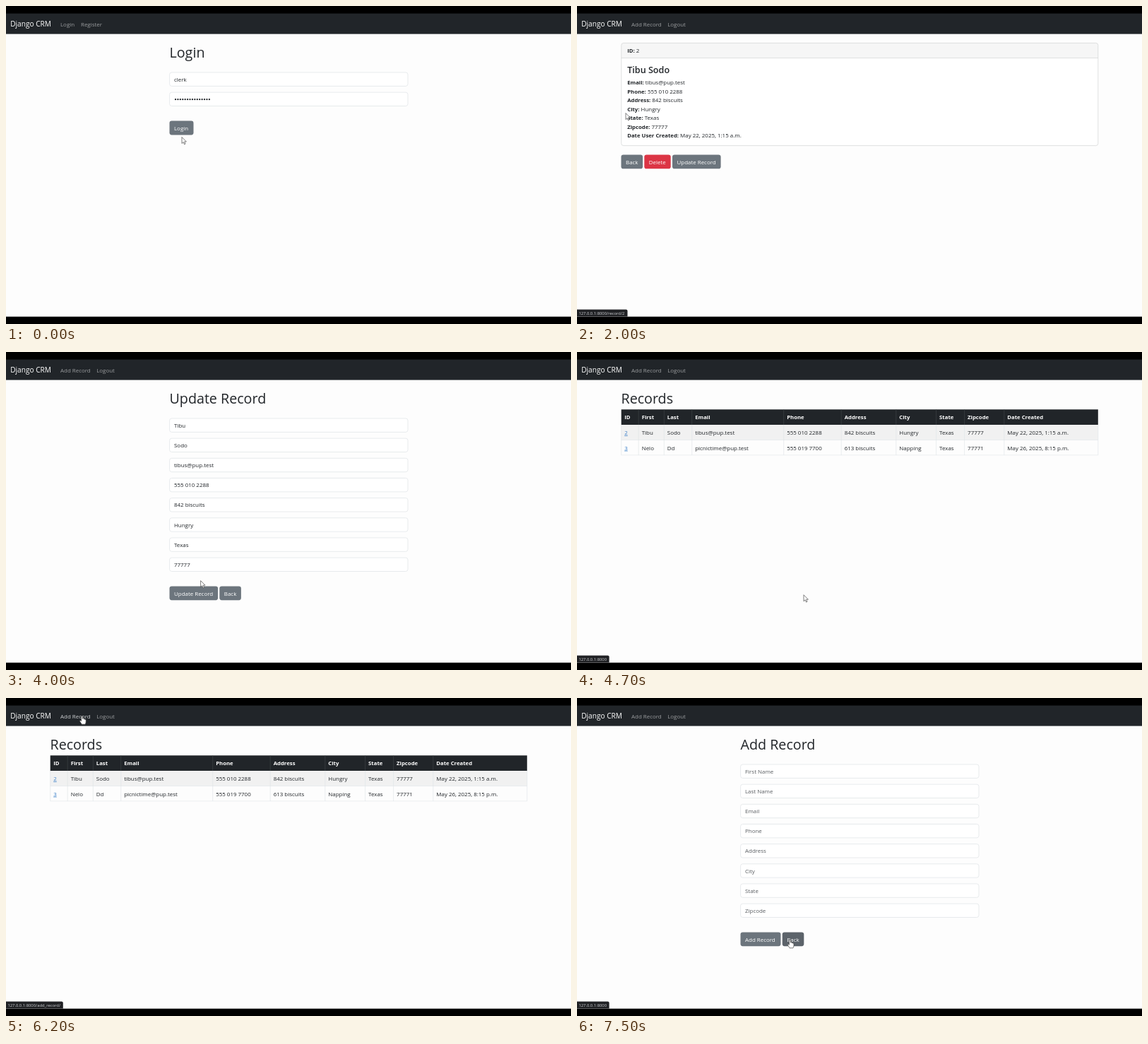
Animation, 800 px wide and 450 px high, one loop 8000 ms. Source, as an HTML page:

```html
<!DOCTYPE html>
<html lang="en">
<head>
<meta charset="utf-8">
<title>Django CRM</title>
<style>
html, body { margin: 0; width: 100%; height: 100%; overflow: hidden; background: #000; }
svg { display: block; width: 800px; height: 450px; }
text { font: 7.95px "Open Sans", "Noto Sans", sans-serif; fill: #212529; }
.b { font-weight: 700; font-size: 7.75px; }
.h1 { font-size: 19.7px; font-weight: 500; }
.h4 { font-size: 12.6px; font-weight: 600; }
.brand { font-size: 10.1px; fill: #fff; }
.nav { fill: #9b9d9f; }
.nav.on { fill: #cfd1d3; }
.white { fill: #fff; }
.hint { fill: #585c60; }
.link { fill: #3a7fc8; text-decoration: underline; }
.tip { font-size: 5.85px; fill: #d0d2d6; }
.btn { fill: #6c757d; }
.btn.red { fill: #dc3545; }
.btn.on { fill: #5c636a; }
.btn.down { fill: #565e64; }
.line { fill: none; stroke: #dee2e6; stroke-width: .6; }
</style>
</head>
<body>
<svg id="stage" viewBox="0 0 800 450"></svg>
<script>
const LOOP = 8000, STEP = 100;
const $ = id => document.getElementById(id);

const people = [
  ['2', 'Tibu', 'Sodo', 'tibus@pup.test', '555 010 2288', '842 biscuits', 'Hungry', 'Texas', '77777', 'May 22, 2025, 1:15 a.m.'],
  ['3', 'Nelo', 'Dd', 'picnictime@pup.test', '555 019 7700', '613 biscuits', 'Napping', 'Texas', '77771', 'May 26, 2025, 8:15 p.m.']
];
const heads = ['ID', 'First', 'Last', 'Email', 'Phone', 'Address', 'City', 'State', 'Zipcode', 'Date Created'];
const cols = [62.7, 87.2, 123.3, 162.7, 292.7, 374.2, 451.8, 508.6, 548.6, 604.8, 737.8];
const rowTop = [103, 124.5], rowH = 21.4, flashH = 38.6;

const text = (x, y, s, cls = '', id = '') => `<text x="${x}" y="${y}" class="${cls}" id="${id}">${s}</text>`;
const rect = (x, y, w, h, attrs) => `<rect x="${x}" y="${y}" width="${w}" height="${h}" ${attrs}/>`;
const group = (id, body) => `<g id="${id}">${body}</g>`;

function button(x, y, w, label, id = '', cls = '') {
  return rect(x, y, w, 19.8, `rx="3.1" class="btn ${cls}" id="${id}"`) + text(x + 6.5, y + 13.1, label, 'white');
}

function field(i, value, cls) {
  const y = 94 + 28.15 * i;
  return rect(231.6, y, 337.4, 19.4, 'rx="3.1" fill="#fff" stroke="#dee2e6" stroke-width=".7"') +
    text(238, y + 12.8, value, cls);
}

function form(id, title, values, cls, w) {
  return group(id, text(231.5, 72.9, title, 'h1') +
    values.map((v, i) => field(i, v, cls)).join('') +
    button(231.5, 331.4, w, title) +
    button(231.5 + w + 2.2, 331.4, 30.6, 'Back', id + 'Back'));
}

function loginPage() {
  let dots = '';
  for (let i = 0; i < 15; i++) dots += `<circle cx="${240 + i * 3.42}" cy="132.2" r="1.15" fill="#212529"/>`;
  return group('login', text(231.5, 72.9, 'Login', 'h1') + field(0, 'clerk', '') + field(1, '', '') +
    dots + button(231.5, 162.6, 34, 'Login'));
}

function listPage() {
  const [left, right] = [cols[0], cols[10]];
  let s = text(62.5, 72.9, 'Records', 'h1') + rect(left, 81.3, right - left, 21.7, 'fill="#212529"');
  rowTop.forEach((y, i) => { s += rect(left, y, right - left, rowH, `id="row${i}"`); });
  const bottom = rowTop[1] + rowH;
  s += `<path class="line" d="M${left} ${rowTop[1]}H${right}M${left} ${bottom}H${right}${cols.map(x => `M${x} 103V${bottom}`).join('')}"/>`;
  s += `<path class="line" style="stroke:#42474b" d="${cols.slice(1, 10).map(x => `M${x} 81.3V103`).join('')}"/>`;
  heads.forEach((h, i) => { s += text(cols[i] + 4.5, 95.3, h, 'b white'); });
  people.forEach((p, r) => p.forEach((v, i) => {
    s += text(cols[i] + 4.5, rowTop[r] + 14.1, v, i ? '' : 'link');
  }));
  return group('list', s);
}

function alertBox() {
  return group('alert', rect(62.8, 52.4, 675, 29.8, 'rx="3.1" fill="#fff1cc" stroke="#fbe3a0" stroke-width=".6"') +
    text(71.2, 70.4, 'Logged In', '" style="fill:#6b5a28') +
    '<path d="M721.2 63.4l7.6 7.6m0-7.6l-7.6 7.6" stroke="#5a5442" stroke-width="1" stroke-linecap="round"/>');
}

function detailPage() {
  const p = people[0], pair = (k, v) => `<tspan class="b">${k}:</tspan> ${v}`;
  let s = rect(62.8, 52.4, 675, 145.2, 'rx="3.1" fill="#fff"') +
    '<path d="M62.8 73.6V55.5q0-3.1 3.1-3.1H734.7q3.1 0 3.1 3.1V73.6Z" fill="#f6f6f6"/>' +
    rect(62.8, 52.4, 675, 145.2, 'rx="3.1" fill="none" stroke="#d3d4d5" stroke-width=".7"') +
    '<path d="M62.8 73.6H737.8" stroke="#d3d4d5" stroke-width=".7"/>' +
    text(71.2, 66.2, pair('ID', p[0])) + text(71.2, 94.7, p[1] + ' ' + p[2], 'h4');
  ['Email', 'Phone', 'Address', 'City', 'State', 'Zipcode', 'Date User Created'].forEach((k, i) => {
    s += text(71.2, 111 + 12.5 * i, pair(k, p[i + 3]));
  });
  return group('detail', s + button(62.5, 210.5, 30.6, 'Back') +
    button(95.3, 210.5, 37.4, 'Delete', '', 'red') + button(135, 210.5, 68.6, 'Update Record', 'updateBtn'));
}

const outline = 'fill="#fff" stroke="#3c3c3c" stroke-width=".65" stroke-linejoin="round"';
$('stage').innerHTML =
  rect(0, 0, 800, 450, 'fill="#000"') + rect(0, 39, 800, 400.6, 'fill="#fdfdfd"') +
  rect(0, 10.6, 800, 29, 'fill="#212529"') + text(6.2, 29, 'Django CRM', 'brand') +
  group('guestNav', text(77, 28.5, 'Login', 'nav') + text(106, 28.5, 'Register', 'nav')) +
  group('userNav', text(77, 28.5, 'Add Record', 'nav', 'addLink') + text(128.2, 28.5, 'Logout', 'nav')) +
  loginPage() + alertBox() + listPage() + detailPage() +
  form('update', 'Update Record', people[0].slice(1, 9), '', 68.6) +
  form('add', 'Add Record', ['First Name', 'Last Name', 'Email', 'Phone', 'Address', 'City', 'State', 'Zipcode'], 'hint', 57) +
  group('status', '<path id="bar" fill="#202124"/>' + text(2.4, 436.9, '', 'tip', 'url')) +
  group('pointer', `<path id="arrow" ${outline} d="M0 0V9L2.1 7.1L3.5 10.3L5 9.6L3.6 6.5H6.4Z"/>` +
    `<path id="hand" ${outline} d="M-1 1Q-1 0 0 0T1 1V4Q2-.0 2.6 4.3Q3.9 3.5 4.2 4.9Q5.6 4.3 5.6 6V8.4Q5.4 9.6 4.6 11.6H-.4Q-1.2 9.8-2.9 7.6Q-3.5 6.3-2.5 6.1Q-1.8 6-1 7.1Z"/>`);

// [start, value] tracks hold each value until the next start
const pages = [[0, 'login'], [100, 'list'], [1900, 'detail'], [4000, 'update'], [4600, 'list'], [6500, 'add']];
const hovers = [[0, ''], [1500, 'row'], [1900, ''], [2600, 'updateBtn'], [4000, ''], [4300, 'updateBack'],
  [4600, ''], [5600, 'addLink'], [6700, ''], [7300, 'addBack']];
const host = '127.0.0.1:8000';
const tips = [[0, '', 0], [1900, host + '/record/2', 71.5], [2200, '', 0], [2600, host + '/update_record/2', 95.5],
  [4000, '', 0], [4400, host, 45.6], [4900, '', 0], [5800, host + '/add_record/', 80.8], [6800, '', 0], [7400, host, 45.6]];
// pointer path: time, x, y
const path = [[0, 249, 185.5], [600, 249, 185.5], [1000, 74, 145.6], [1300, 69, 151.6], [2000, 69, 151.6],
  [2600, 167, 220], [3900, 167, 220], [4000, 275.6, 323.6], [4400, 321, 343.7], [4800, 321, 343.7],
  [5600, 107.6, 25.6], [6600, 107.6, 25.6], [7300, 301.4, 342.2], [8000, 301.4, 342.2]];

const at = (track, t) => track.filter(k => k[0] <= t).pop();
const show = (id, on) => { $(id).style.display = on ? '' : 'none'; };

function pointerAt(t) {
  const i = Math.max(1, path.findIndex(k => k[0] > t));
  const [a, b] = [path[i - 1], path[i]];
  const u = (t - a[0]) / (b[0] - a[0]), e = u * u * (3 - 2 * u);
  return [a[1] + (b[1] - a[1]) * e, a[2] + (b[2] - a[2]) * e];
}

function draw(t) {
  const page = at(pages, t)[1], hover = at(hovers, t)[1], [, url, width] = at(tips, t);
  const [x, y] = pointerAt(t), flash = page === 'list' && t < 1900;
  ['login', 'list', 'detail', 'update', 'add'].forEach(id => show(id, id === page));
  show('guestNav', page === 'login');
  show('userNav', page !== 'login');
  show('alert', flash);

  const shift = flash ? flashH : 0;
  $('list').setAttribute('transform', `translate(0 ${shift})`);
  rowTop.forEach((top, i) => {
    const over = x > cols[0] && x < cols[10] && y >= top + shift && y < top + shift + rowH;
    $('row' + i).setAttribute('fill', over ? '#ebebeb' : i ? '#fdfdfd' : '#f1f1f1');
  });

  ['updateBtn', 'updateBack', 'addBack', 'addLink'].forEach(id => $(id).classList.toggle('on', hover === id));
  $('updateBtn').classList.toggle('down', t >= 2900 && t < 3100);

  show('status', url);
  $('url').textContent = url;
  $('bar').setAttribute('d', `M0 429.4H${Math.max(2, width) - 2}q2 0 2 2V439.6H0Z`);

  $('pointer').setAttribute('transform', `translate(${x.toFixed(2)} ${y.toFixed(2)})`);
  show('arrow', !hover);
  show('hand', hover);
}

const start = performance.now();
function tick() {
  const t = (performance.now() - start) % LOOP;
  draw(Math.floor(t / STEP) * STEP);
  requestAnimationFrame(tick);
}
tick();
</script>
</body>
</html>
```
